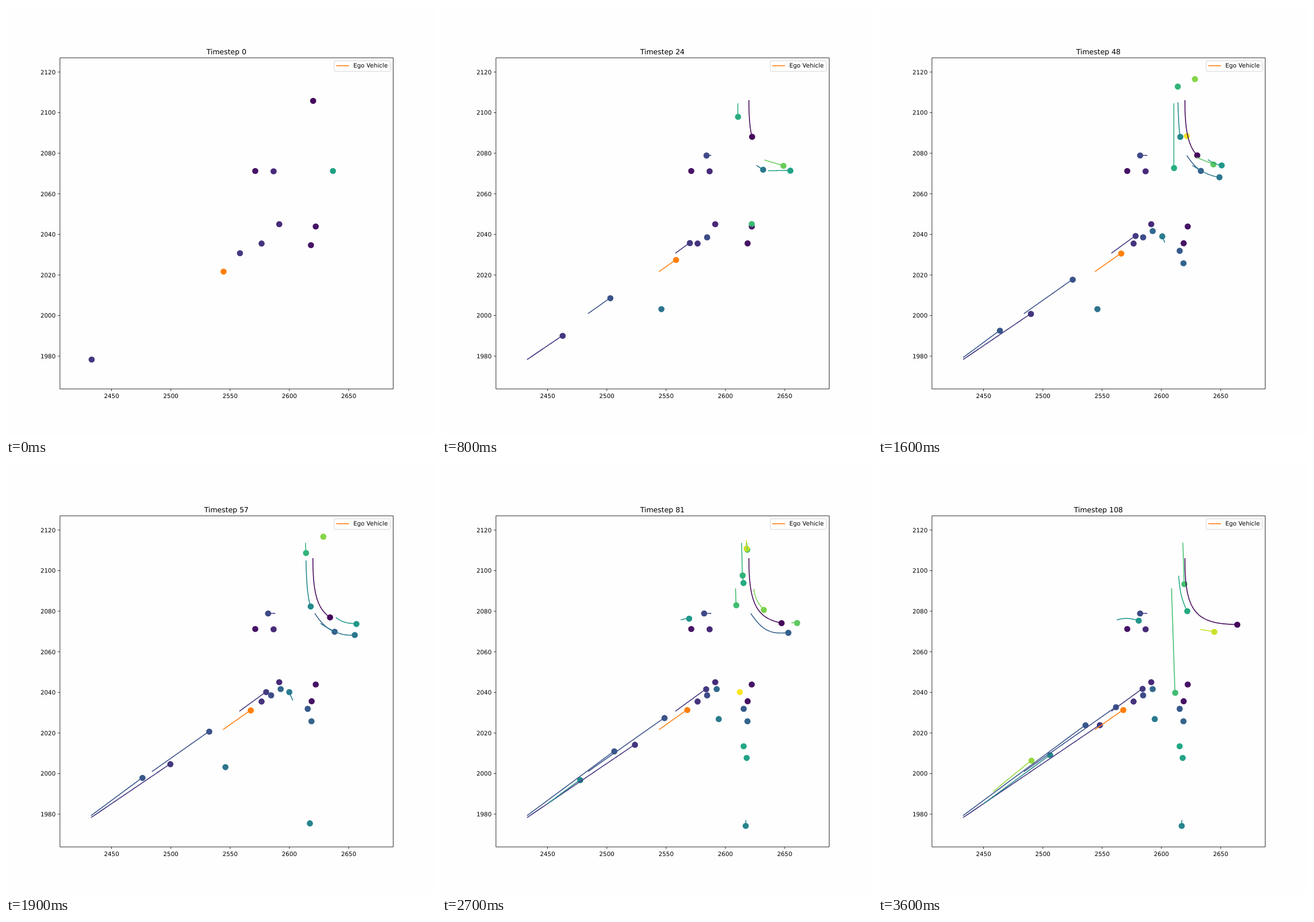
An HTML page that plays this animation: 748 px wide and 748 px high, repeating every 3.7 s.

```html
<!DOCTYPE html>
<html lang="en">
<head>
<meta charset="utf-8">
<title>Vehicle tracks</title>
<style>
  html, body { margin: 0; width: 100%; height: 100%; overflow: hidden; background: #fefefe; }
  svg { display: block; width: 748px; height: 748px; }
  text { font: 10.39px "DejaVu Sans", sans-serif; fill: #000; text-rendering: geometricPrecision; }
  #title { font-size: 12.47px; }
  .mid { text-anchor: middle; }
  .end { text-anchor: end; }
  .axis { fill: none; stroke: #000; stroke-width: .83; }
  #trails path { fill: none; stroke-width: 1.56; stroke-linecap: square; stroke-linejoin: round; }
</style>
</head>
<body>
<svg viewBox="0 0 748 748">
  <g id="dots"></g>
  <g id="trails" transform="translate(-.4 -.4)"></g>
  <g id="axes"><path class="axis" d="M93.87 90.13H673.57V666.1H93.87Z"/></g>
  <text id="title" class="mid" x="383.4" y="83.6"></text>
  <rect x="571" y="95.3" width="97.3" height="18.5" rx="2" fill="#fff" fill-opacity=".8" stroke="#ccc" stroke-opacity=".8"/>
  <path d="M575.2 103.9H596" stroke="#ff7f0e" stroke-width="1.56" stroke-linecap="square"/>
  <text x="604.2" y="107.4">Ego Vehicle</text>
</svg>
<script>
const FRAME = 100, FRAMES = 37, STEPS = 3, LAST = 108, EGO = 2;
const $ = id => document.getElementById(id);
const mix = (a, b, f) => a + (b - a) * f;

function add(parent, tag, attrs, text = '') {
  const el = document.createElementNS('http://www.w3.org/2000/svg', tag);
  for (const key in attrs) el.setAttribute(key, attrs[key]);
  el.textContent = text;
  return parent.appendChild(el);
}

// Axis ticks
for (let i = 0; i < 5; i++) {
  const x = 183.6 + i * 103.12;
  add($('axes'), 'path', { class: 'axis', d: `M${x} 666.1v3.64` });
  add($('axes'), 'text', { class: 'mid', x, y: 681.6 }, 2450 + i * 50);
}
for (let i = 0; i < 8; i++) {
  const y = 609.1 - i * 70.6;
  add($('axes'), 'path', { class: 'axis', d: `M93.87 ${y}h-3.64` });
  add($('axes'), 'text', { class: 'end', x: 86.3, y: y + 3.9 }, 1980 + i * 20);
}

// Viridis colour scale; the ego vehicle lies beyond it
const stops = ['440154', '482475', '414487', '355f8d', '2a788e', '21918c',
  '22a884', '44bf70', '7ad151', 'bddf26', 'fde725'];
function paint(value) {
  if (value === EGO) return '#ff7f0e';
  const i = Math.min(9, Math.floor(value * 10));
  const part = (stop, k) => parseInt(stop.slice(k * 2, k * 2 + 2), 16);
  return `rgb(${[0, 1, 2].map(k =>
    Math.round(mix(part(stops[i], k), part(stops[i + 1], k), value * 10 - i)))})`;
}

// A car drives from `from` at step `enter` to `to` at step `arrive`, with constant acceleration:
// accel 0 is steady, -1 brakes to a stop. `corner` bends the way towards a point.
const cars = [];
function drive(value, enter, arrive, from, to, { accel = 0, corner, leave = arrive } = {}) {
  cars.push({ value, enter, arrive, from, to, accel, corner, leave });
}
const park = (value, x, y, enter = 0, leave = LAST) =>
  drive(value, enter, leave, [x, y], [x, y]);
const brake = { accel: -1, leave: LAST };
const cruise = { accel: -.2 };

// Long diagonal road
drive(EGO, 0, 66, [378.5, 462], [426.7, 428], brake);
drive(.17, 0, 92, [407, 430], [460.3, 391.2], brake);
drive(.16, 0, LAST, [149, 615], [386, 454.3], cruise);
drive(.27, 27, LAST, [149, 611.5], [361, 454.5], cruise);
drive(.25, 7, LAST, [255, 535], [414, 423], { accel: -.5 });
drive(.46, 60, LAST, [184.5, 591], [299.5, 506.5], cruise);
drive(.84, 86, LAST, [201, 570], [267, 516]);

// Southbound, straight on
drive(.62, 18, 51, [515, 170.5], [515, 293]);
drive(.65, 47, 82, [521.5, 138.5], [523, 195.5]);
drive(.92, 76, 86, [529.8, 133.5], [530, 161]);
drive(.7, 76, LAST, [530.7, 138], [533, 209]);
drive(.69, 76, LAST, [511, 217.5], [517, 398]);

// Southbound, turning east
drive(.02, 0, LAST, [534.3, 165], [625, 279.5], { accel: -.37, corner: [534, 279] });
drive(.47, 27, 75, [522.3, 169], [549, 279], { accel: .3, corner: [524, 255] });
drive(.3, 27, 90, [538, 261], [616, 291.5], { accel: -.2, corner: [565, 301] });
drive(.4, 18, 72, [548, 278], [631, 291], { corner: [590, 306] });
drive(.8, 60, 90, [543, 218.5], [570, 265], { accel: -.45, corner: [546, 240] });
drive(.61, 77, LAST, [523.5, 195.5], [538, 256], { accel: -.2, corner: [526, 230] });

// Eastbound
drive(.57, 0, 39, [568.7, 287], [631.7, 286], { accel: .1 });
drive(.77, 4, 24, [562, 268.5], [594, 278]);
drive(.75, 28, 54, [555, 264], [592, 279]);
drive(.53, 29, 72, [575, 268], [628, 278.5], { accel: -.5, corner: [590, 279] });
drive(.87, 58, 74, [620, 274], [653, 271.5], { accel: -.45 });
drive(.75, 77, 90, [609, 276.5], [645, 277], { accel: .3 });
drive(.92, 96, LAST, [561.5, 288.3], [585, 292]);
drive(.52, 63, LAST, [416.5, 271.5], [453.5, 272.5], { corner: [432, 267] });

// Creeping to a halt
drive(.05, 0, 33, [530.5, 416], [531.7, 412.7], brake);
drive(.22, 10, 44, [468, 260.3], [456, 260], brake);
drive(.42, 28, 72, [499, 411], [490.5, 391.5], { accel: -.3 });
drive(.82, 44, 74, [551, 127.5], [553.4, 125]);
drive(.45, 53, 66, [529, 620.5], [528.3, 629.5], brake);

// Standing
park(.05, 433.6, 287);
park(.12, 465.5, 287.5);
park(.12, 475.3, 379.5);
park(.05, 538.8, 383.5);
park(.15, 444.6, 413.2);
park(.23, 461.2, 402.4, 8);
park(.38, 381.7, 527.3, 7, 57);
park(.68, 538.8, 379.3, 9, 42);
park(.94, 561, 282.3, 11, 18);
park(.96, 115, 605.5, 11, 20);
park(.28, 524.8, 425.9, 26);
park(.33, 477.8, 391.5, 37);
park(.32, 531.4, 447.5, 38);
park(.98, 537.3, 226.3, 47, 51);
park(.41, 481.4, 443.7, 61);
park(.58, 530, 511.3, 70);
park(.6, 524.7, 491, 72);
park(1, 518, 396.8, 80, 84);

cars.sort((a, b) => a.value - b.value);
for (const car of cars) {
  const color = paint(car.value);
  car.dot = add($('dots'), 'circle', { r: 5.35, fill: color });
  car.trail = add($('trails'), 'path', { stroke: color });
}

function place({ enter, arrive, from, to, accel, corner }, step) {
  const time = Math.min(1, (step - enter) / (arrive - enter));
  const u = time - accel * time * (1 - time), w = 1 - u;
  return from.map((a, k) => {
    const b = to[k];
    if (!corner) return mix(a, b, u);
    const c = mix(a, corner[k], .8), d = mix(b, corner[k], .8);
    return w * w * w * a + 3 * w * w * u * c + 3 * w * u * u * d + u * u * u * b;
  });
}

function draw(step) {
  $('title').textContent = 'Timestep ' + step;
  for (const car of cars) {
    const shown = step >= car.enter && step <= car.leave;
    car.dot.style.display = car.trail.style.display = shown ? '' : 'none';
    if (!shown) continue;
    const path = [];
    for (let s = car.enter; s <= step; s++) path.push(place(car, s).map(n => n.toFixed(2)));
    const [x, y] = path[path.length - 1];
    car.dot.setAttribute('cx', x);
    car.dot.setAttribute('cy', y);
    car.trail.setAttribute('d', 'M' + path.join('L'));
  }
}

let shownFrame = -1;
function tick() {
  const frame = Math.floor(performance.now() / FRAME) % FRAMES;
  if (frame !== shownFrame) draw((shownFrame = frame) * STEPS);
  requestAnimationFrame(tick);
}
tick();
</script>
</body>
</html>
```
